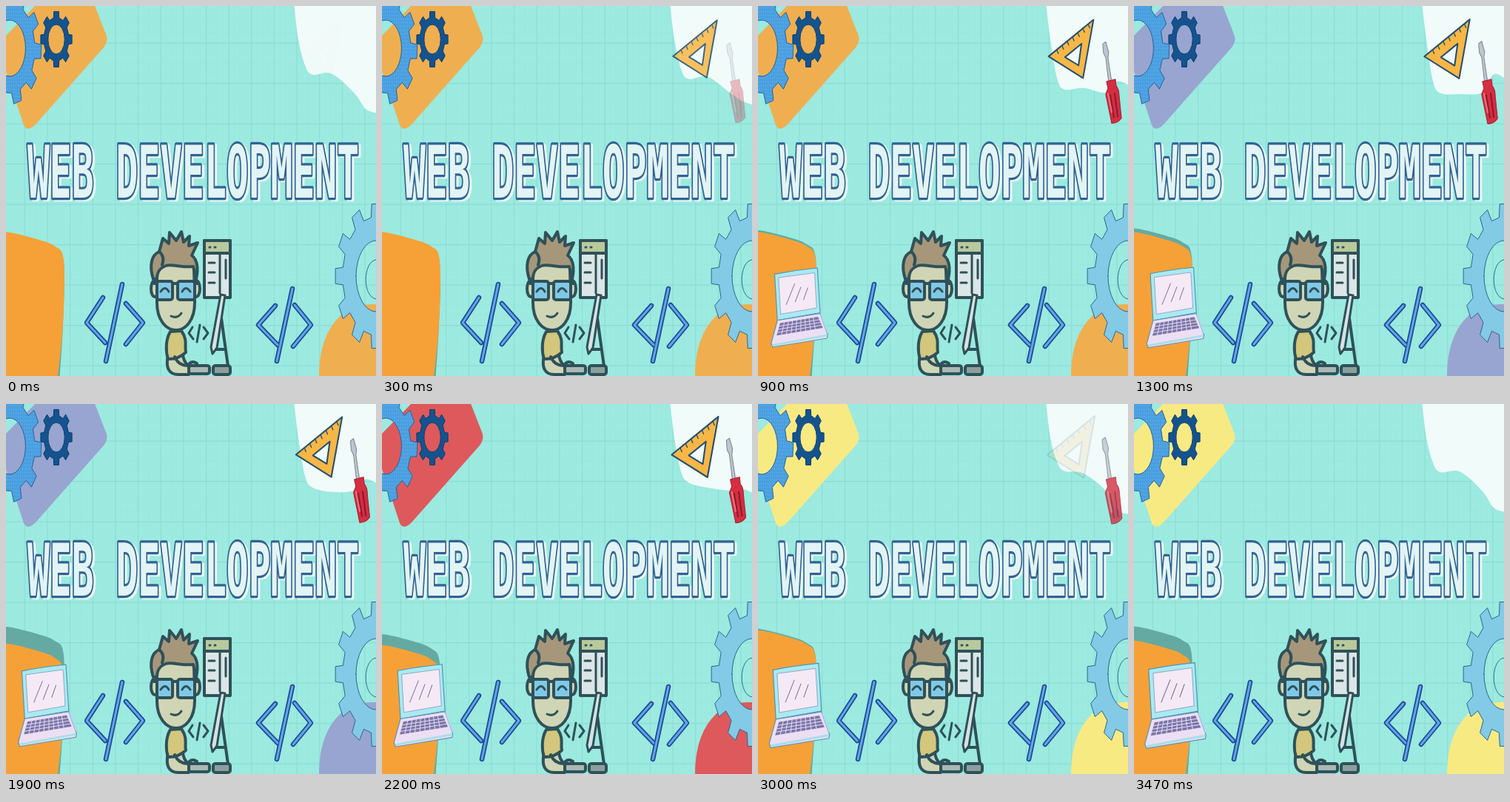
Recreate the animation shown at these times as an HTML page. Size 500x500 px, loop 3.51 s.

```html
<!DOCTYPE html>
<html lang="en">
<head>
<meta charset="utf-8">
<title>Web Development</title>
<style>
html, body { margin: 0; height: 100%; overflow: hidden; background: #9ceae0; }
svg { display: block; width: 100vw; height: 100vh; stroke-linecap: round; stroke-linejoin: round; }
.title { font: bold 98px "DejaVu Sans Mono", monospace; text-anchor: middle; paint-order: stroke; stroke-width: 6.5; }
.title text { vector-effect: non-scaling-stroke; }
.line { fill: none; }
</style>
</head>
<body>
<svg viewBox="0 0 500 500" preserveAspectRatio="none">
  <defs>
    <pattern id="grid" x="24.8" y="49.5" width="30.65" height="54.5" patternUnits="userSpaceOnUse">
      <path d="M7.7 0V54.5M15.3 0V54.5M23 0V54.5M0 13.6H31M0 27.2H31M0 40.9H31" stroke="#98e7dd" stroke-width=".7"/>
      <path d="M.5 0V54.5M0 .6H31" stroke="#8bdcd4" stroke-width="1.1"/>
    </pattern>
    <pattern id="dots" width="3" height="5" patternUnits="userSpaceOnUse">
      <rect width="3" height="5" fill="#4a9fe0"/>
      <ellipse cx="1.5" cy="2.5" rx=".6" ry="1" fill="#62b0e9"/>
    </pattern>
    <path id="brackets" d="M131 394L109 428L134 455M157 376L135 480M162 402L185 428L162 457
      M364 405L341 431L367 458M387 382L366 480M390 404L412 431L388 460"/>
    <g id="words"><text>WEB DEVELOPMENT</text></g>
  </defs>

  <rect width="500" height="500" fill="#9ceae0"/>
  <rect width="500" height="500" fill="url(#grid)"/>

  <g id="tint">
    <path d="M42 -3H119L135 38Q139 47 132 56L40 160Q29 171 24 161L0 88V40Z"/>
    <path d="M423 500C423 457 437 428 460 412Q478 402 500 403V500Z"/>
  </g>
  <path id="cloud" fill="#f1fbfa"/>
  <path id="shade" fill="#64aaa3"/>
  <path id="hill" fill="#f6a137"/>
  <g id="gears" fill-rule="evenodd"></g>
  <path class="line" stroke="#2e6f96" d="M500 343C482 345 481 393 500 396"/>

  <g class="title">
    <use href="#words" transform="translate(256 261) scale(.5065 1)" fill="#e9f8f8" stroke="#e9f8f8"/>
    <use href="#words" transform="translate(253 259) scale(.5065 1)" fill="#e3f4f6" stroke="#316392"/>
  </g>

  <use href="#brackets" class="line" stroke="#20498f" stroke-width="6.5"/>
  <use href="#brackets" class="line" stroke="#5fa6ee" stroke-width="3"/>

  <g stroke="#2f5159" stroke-width="4">
    <path fill="#d0d5b5" d="M219 472C215 490 221 498 233 498H247V486C241 482 239 476 239 469Z"/>
    <path fill="#d3c67d" d="M222 440C215 452 216 468 219 477Q232 478 243 468C241 458 246 452 237 439Z"/>
    <path class="line" d="M228 474Q233 486 246 486Q250 478 258 483"/>
    <path class="line" d="M291 422L301 494M284 464H296"/>
    <rect x="247" y="486" width="28" height="11" rx="3" fill="#a9b9b3"/>
    <rect x="280" y="486" width="23" height="12" rx="3" fill="#8ba09c"/>
    <ellipse cx="201" cy="382" rx="5" ry="11" fill="#d0d5b5"/>
    <ellipse cx="257" cy="382" rx="5" ry="11" fill="#d0d5b5"/>
    <path fill="#d0d5b5" d="M204 350H254L255 401C255 424 243 438 230 438C216 438 204 424 204 401Z"/>
    <path fill="#a6977a" d="M199 369C193 350 197 336 207 332L212 314L220 321L221 306L230 317L237 305L240 319L248 311L247 324L259 320L251 337C259 343 260 356 257 369L253 352C240 354 222 348 216 351C208 354 204 359 204 369Z"/>
    <path class="line" d="M207 332Q215 338 211 350M200 375H259"/>
    <rect x="204" y="372" width="21" height="25" rx="3" fill="#80c9e6"/>
    <rect x="232" y="372" width="23" height="25" rx="3" fill="#80c9e6"/>
    <path fill="#dce6e6" d="M268 317H303V394H268Z"/>
    <path fill="#b8c99c" d="M268 317H303V334H268Z"/>
    <g stroke-width="3">
      <path class="line" d="M209 386Q215 377 220 386M238 386Q243 377 249 386M223 419Q232 423 237 415"/>
      <path class="line" d="M275 326H276M282 326H283M274 347H282M274 360H282M274 374H282M289 336V388M297 343V368"/>
      <path fill="#d8e2e2" d="M290 390L296 391L285 462L279 470L277 461Z"/>
      <path class="line" d="M252 434L247 442L253 450M262 431L258 454M267 434L273 442L267 450"/>
    </g>
  </g>

  <g id="ruler" stroke="#234f70" stroke-width="2">
    <path fill="#f7b746" fill-rule="evenodd" d="M453 19L393 68L439 97ZM437 51L433 80L415 69Z"/>
    <path id="ticks" stroke-width="1.3"/>
  </g>

  <g id="driver">
    <path fill="#bfc5d0" stroke="#7c8794" d="M466 52L470 49L474 63L473 70L478 103L474 104L470 70L467 64Z"/>
    <path fill="#d52e40" stroke="#a51e32" d="M471 102L483 99L484 108Q488 112 488 122L491 151Q486 158 478 158L470 119L473 111Z"/>
    <path class="line" stroke="#8c1930" stroke-width="2" d="M476 120L481 150M482 118L486 149"/>
    <path class="line" stroke="#f0717c" stroke-width="2" d="M473 118L478 143"/>
  </g>

  <g id="laptop">
    <path fill="#a9eaf0" stroke="#4f93b4" stroke-width="1.2" d="M20 359Q50 353 82 350L86 415L24 426Z"/>
    <path fill="#f4e9f5" stroke="#8fa6cc" d="M26 364L78 357L81 408L29 417Z"/>
    <path class="line" stroke="#756b91" d="M37 403L49 373M50 399L58 378M62 396L68 379"/>
    <path fill="#ecdff4" stroke="#5a91b6" stroke-width="1.2" d="M24 426L86 416L97 447L96 452L17 465L15 459Z"/>
    <path class="line" stroke="#a7dfe9" stroke-width="3" d="M18 462L95 448M88 418L97 443"/>
    <path fill="#7b75aa" d="M28 430L83 421L90 437L23 448Z"/>
    <path id="keys" class="line" stroke="#e9dff3"/>
  </g>
</svg>
<script>
const LOOP = 3510, SQUEEZE = 0.5625;
const $ = id => document.getElementById(id);
const ramp = (t, a, b) => Math.min(1, Math.max(0, (t - a) / (b - a)));
const repeat = (n, make) => Array.from({ length: n }, (_, i) => make(i)).join('');

function addGear(fill, stroke, cx, cy, teeth, tip, body, hole, phase) {
  const step = 2 * Math.PI / teeth, rx = hole * SQUEEZE;
  const point = (angle, r) => `${cx + SQUEEZE * r * Math.cos(angle)} ${cy + r * Math.sin(angle)}`;
  const rim = repeat(teeth, i => [[-0.28, body], [-0.2, tip], [0.2, tip], [0.28, body]]
    .map(([offset, r]) => 'L' + point(phase + (i + offset) * step, r)).join(''));
  const ring = `M${cx - rx} ${cy}a${rx} ${hole} 0 1 0 ${2 * rx} 0a${rx} ${hole} 0 1 0 ${-2 * rx} 0Z`;
  $('gears').innerHTML += `<path d="M${rim.slice(1)}Z${ring}" fill="${fill}" stroke="${stroke}"/>`;
}
addGear('url(#dots)', '#28629a', 5, 57, 10, 76, 61, 38, 0.06);
addGear('#14538e', '#0d3d70', 68, 45, 8, 38, 30, 20, Math.PI / 2);
addGear('#83cae6', '#2d658a', 500, 365, 12, 98, 80, 48, 0);

$('ticks').setAttribute('d', repeat(7, i => `M${446 - 7 * i} ${25 + 5.7 * i}l2 5`));
$('keys').setAttribute('d',
  repeat(3, i => `M${27 - i * 1.3} ${434.5 + i * 4.5}L${85 + i * 1.7} ${425 + i * 4}`) +
  repeat(8, i => `M${34 + i * 6} ${429 - i}L${30 + i * 7} ${447 - i * 1.2}`));

// Smooth curve through a list of points
function curve(points) {
  return `M${points[0]}` + repeat(points.length - 1, i => {
    const b = points[i], c = points[i + 1];
    const a = points[i - 1] || b, e = points[i + 2] || c;
    return `C${b[0] + (c[0] - a[0]) / 6} ${b[1] + (c[1] - a[1]) / 6} ` +
      `${c[0] - (e[0] - b[0]) / 6} ${c[1] - (e[1] - b[1]) / 6} ${c}`;
  });
}

// The cloud rocks: its left side sinks while its right side rises
function cloudPath(t) {
  const rock = Math.cos(2 * Math.PI * (t - 1400) / LOOP);
  const lag = Math.cos(2 * Math.PI * (t - 1600) / LOOP);
  const left = 104 + 14 * rock, right = 124 - 26 * rock;
  return curve([[389, -5], [395, 45], [404, left * 0.86], [414, left],
    [440, 106 + 15 * lag], [470, 117], [486, right - 6], [502, right]]) + 'V-5Z';
}

const moundPath = (top, foot) =>
  curve([[-10, top], [5, top], [38, top + 8], [65, top + 18], [78, top + 38], [77, 430], [foot, 510]]) + 'H-10Z';

// Each part grows slowly around its centre and is drawn at full size at time `base`
function place(id, cx, cy, t, base, opacity) {
  const scale = 1 + 0.03 * (t - base) / 1000;
  $(id).setAttribute('transform', `translate(${cx} ${cy}) scale(${scale}) translate(${-cx} ${-cy})`);
  $(id).setAttribute('opacity', opacity);
}

const tints = ['#efaf50', '#98a5d0', '#de595c', '#f8ea83'];

function draw(now) {
  const t = now % LOOP;
  $('tint').setAttribute('fill', tints[Math.floor(t / 1000)]);

  const hillDrop = Math.sin(Math.PI * Math.max(0, t - 1250) / 1700) ** 2;
  const shadeDrop = Math.cos(Math.PI * (t - 2530) / 2130) ** 8;
  $('cloud').setAttribute('d', cloudPath(t));
  $('hill').setAttribute('d', moundPath(306 + 21 * hillDrop, 69));
  $('shade').setAttribute('d', moundPath(301 + 28 * shadeDrop, 72));

  place('ruler', 423, 57, t, 530, ramp(t, 0, 350) * (1 - ramp(t, 2740, 3040)));
  place('driver', 479, 103, t, 530, ramp(t, 180, 560) * (1 - ramp(t, 2940, 3240)));
  place('laptop', 56, 408, t, 3200, ramp(t, 400, 800));
  requestAnimationFrame(draw);
}
requestAnimationFrame(draw);
</script>
</body>
</html>
```
